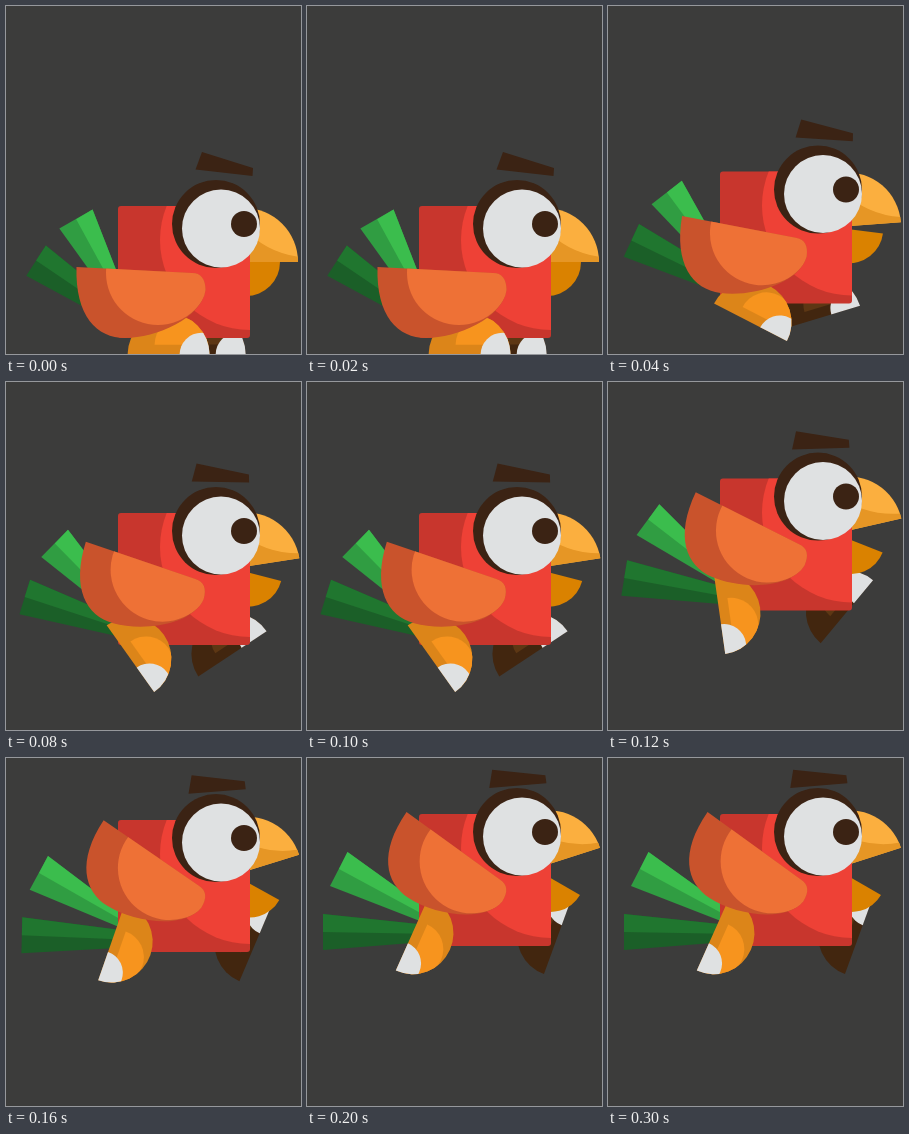
An HTML page with a canvas that plays this animation: 295x348 px, repeating every 360 ms.

```html
<!DOCTYPE html>
<html lang="en">
<head>
<meta charset="utf-8">
<title>Bird hop</title>
<style>
html, body { margin: 0; width: 100%; height: 100%; overflow: hidden; background: #3c3c3b; }
canvas { display: block; }
</style>
</head>
<body>
<canvas id="stage" width="295" height="348"></canvas>
<script>
const ctx = document.getElementById('stage').getContext('2d');
const LOOP = 360, TICK = 40, LAST = 200, RISE = 167, LIFT = 144;
const BROWN = '#3b2314', WHITE = '#dfe1e2';

function fill(color, path) {
  ctx.fillStyle = color;
  ctx.beginPath();
  path();
  ctx.fill();
}

function disc(color, x, y, r, from = 0, to = Math.PI * 2) {
  fill(color, () => ctx.arc(x, y, r, from, to));
}

function poly(color, ...pts) {
  fill(color, () => pts.forEach(([x, y]) => ctx.lineTo(x, y)));
}

// Runs draw() rotated by deg around a pivot.
function turn(x, y, deg, draw) {
  ctx.save();
  ctx.translate(x, y);
  ctx.rotate(deg * Math.PI / 180);
  ctx.translate(-x, -y);
  draw();
  ctx.restore();
}

function clipTo(path, draw) {
  ctx.save();
  ctx.beginPath();
  path();
  ctx.clip();
  draw();
  ctx.restore();
}

// A half disc with a white toe, swinging below the hip at (x, y).
function leg(x, y, deg, dx, dy, dark, light) {
  const cx = x + dx, cy = y + dy;
  const half = () => ctx.arc(cx, cy, 41, Math.PI, 0);
  turn(x, y, deg, () => {
    fill(dark, half);
    clipTo(half, () => {
      disc(light, cx + 13, cy - 10, 27, Math.PI, 0);
      disc(WHITE, cx + 33, cy, 22);
    });
  });
}

function upperBeak() {
  const shape = () => {
    ctx.moveTo(238, 56);
    ctx.arc(238, 56, 54, -Math.PI / 2, 0);
  };
  fill('#fbaf3f', shape);
  clipTo(shape, () => fill('#e69625', () => {
    ctx.moveTo(236, 20);
    ctx.quadraticCurveTo(258, 46, 293, 51);
    ctx.lineTo(293, 57);
    ctx.lineTo(236, 57);
  }));
}

function lowerBeak() {
  fill('#da8200', () => {
    ctx.moveTo(240, 56);
    ctx.arc(240, 56, 34, 0, Math.PI / 2);
  });
}

function body() {
  const shape = () => ctx.roundRect(112, 0, 132, 132, 3);
  fill('#c8362d', shape);
  clipTo(shape, () => disc('#ee4136', 244, 34, 90));
}

function eye() {
  disc(BROWN, 210, 18, 44);
  disc(WHITE, 215, 22.5, 39);
  disc(BROWN, 238, 18, 13);
}

function wing() {
  const shape = () => {
    ctx.moveTo(70.5, 61);
    ctx.bezierCurveTo(69, 110, 91, 132, 119, 132);
    ctx.bezierCurveTo(150, 132, 196, 112, 199.5, 84);
    ctx.bezierCurveTo(199.5, 73, 195, 67, 186, 67);
    ctx.closePath();
  };
  fill('#c9532c', shape);
  clipTo(shape, () => disc('#ee7136', 152, 67, 52));
}

function paint(t) {
  const p = Math.min(t / RISE, 1), rest = 1 - p;
  ctx.fillStyle = '#3c3c3b';
  ctx.fillRect(0, 0, 295, 348);
  ctx.save();
  ctx.translate(0, 200 - LIFT * p);

  leg(203.2 + 18.3 * p, 115.5 - 9.5 * p, -70 * p, -4.5, 33, '#42260f', '#5d3714');
  turn(227, 66.6, 30 * p, lowerBeak);
  turn(222, 42, -18 * p, upperBeak);

  turn(130, 110, 33 * rest, () => {
    poly('#1b5f28', [16, 100], [16, 136], [130, 127], [130, 112]);
    poly('#20762f', [16, 100], [16, 118], [130, 120], [130, 112]);
  });
  turn(121.7, 98.5, 33 * rest, () => {
    poly('#309d42', [40.5, 38], [23, 72], [118, 109], [124, 98]);
    poly('#3bbd4d', [40.5, 38], [32, 55], [121, 103], [124, 98]);
  });

  body();
  leg(155.7 - 17 * p, 115.4 + 11 * p, 114 * p, 6.9, 33.3, '#dc8519', '#f7941e');
  eye();
  turn(239, 5, -11.4 * p, () =>
    poly(BROWN, [196, -54], [247, -38], [246.5, -30], [189.5, -36.5]));
  turn(191.5, 78.5, 33 * p, wing);
  ctx.restore();
}

// The motion runs at 25 poses per second and rests on the last one.
function loop() {
  const t = performance.now() % LOOP;
  paint(Math.min(Math.floor(t / TICK) * TICK, LAST));
  requestAnimationFrame(loop);
}
loop();
</script>
</body>
</html>
```
